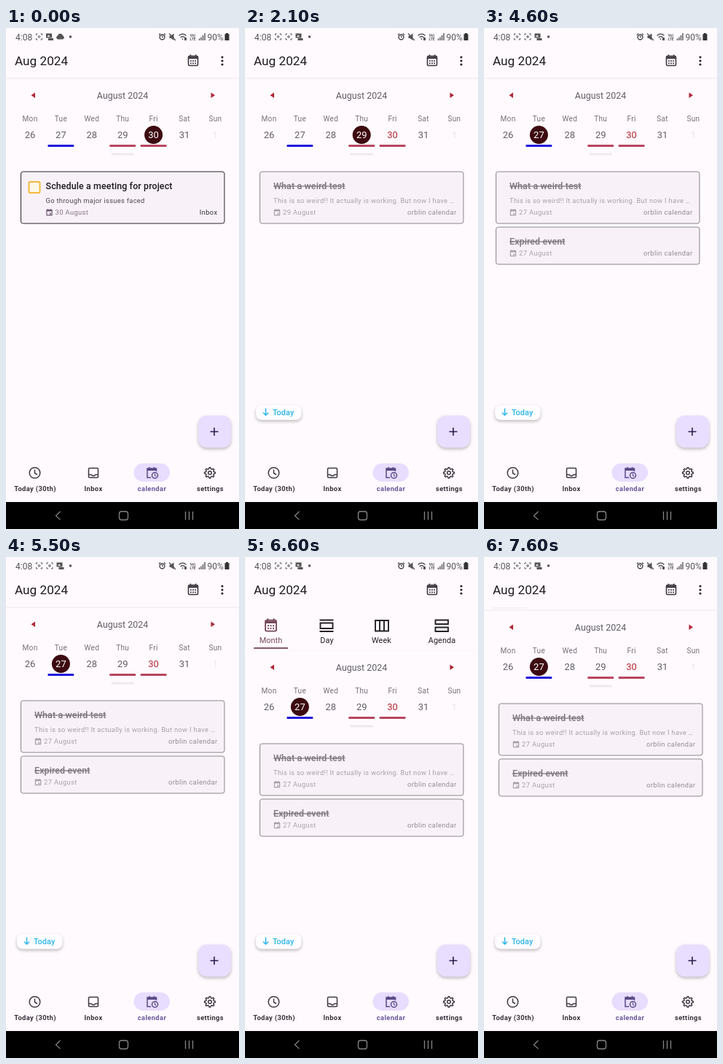
Animation, 320 px wide and 687 px high, one loop 8000 ms. Source, as an HTML page:

```html
<!DOCTYPE html>
<html lang="en">
<head>
<meta charset="utf-8">
<title>Task calendar</title>
<style>
html, body { margin: 0; width: 100%; height: 100%; overflow: hidden; background: #fffafe; }
svg { display: block; width: 100vw; height: 100vh; font-family: Roboto, sans-serif; }
.title { font-size: 12.45px; font-weight: 500; letter-spacing: .117px; }
.small { font-size: 9.34px; letter-spacing: .31px; }
.label { font-size: 9.34px; letter-spacing: .39px; }
.body { font-size: 10.9px; letter-spacing: .08px; }
.nav { font-weight: 600; }
.mid { text-anchor: middle; }
.end { text-anchor: end; }
.line { fill: none; stroke: currentColor; }
.raised { filter: drop-shadow(0 2px 2px #0004); }
</style>
</head>
<body>
<svg viewBox="0 0 320 687" preserveAspectRatio="none">
  <defs>
    <g id="event" class="line" stroke-width="1.2">
      <path d="M-3.6-3.4h7.2v7h-7.2zM-2-5v2M2-5v2"/>
      <path d="M-3.6-2.6h7.2" stroke-width="2"/>
      <path d="M.3.6h2v2h-2z" fill="currentColor" stroke="none"/>
    </g>
    <g id="month" class="line" stroke-width="1.6">
      <rect x="-6.5" y="-6" width="13" height="13" rx="1.5"/>
      <path d="M-6.5-3.7h13" stroke-width="3"/>
      <path d="M-3.6-8v3M3.6-8v3"/>
      <path d="M-4 .6h8M-4 3.8h8" stroke-width="1.7" stroke-dasharray="1.8 1.3"/>
    </g>
    <g id="scan" class="line" stroke-width="1">
      <path d="M-4-2v-2h2M2-4h2v2M4 2v2h-2M-2 4h-2v-2"/>
      <circle r="1.3"/>
    </g>
    <g id="picture">
      <path d="M-5-4.5h8v6h-8zM-2 2h7v3h-7z" fill="currentColor"/>
      <path d="M-3.5 0l2-2.5 2 2.5z" fill="#fffafe"/>
    </g>
    <path id="cloud" d="M-3.5 3.5a2.6 2.6 0 0 1 0-5a3.6 3.6 0 0 1 7 0a2.6 2.6 0 0 1 0 5z" fill="currentColor"/>
    <clipPath id="tabClip"><rect id="tabWindow" y="69" width="320" height="0"/></clipPath>
  </defs>

  <rect width="320" height="687" fill="#fffafe"/>

  <g color="#555" fill="#555">
    <text x="13" y="16.5" font-size="12">4:08</text>
    <use href="#scan" x="45.5" y="12"/>
    <g id="noticesA"><use href="#picture" x="60" y="12"/><use href="#cloud" x="74.5" y="12"/></g>
    <g id="noticesB"><use href="#scan" x="60" y="12"/><use href="#picture" x="74.5" y="12"/></g>
    <circle cx="88.5" cy="12" r="1.8"/>
    <g class="line" stroke-width="1.6">
      <circle cx="214.5" cy="12.5" r="3.4"/>
      <path d="M214.5 10.5v2h1.5M210 9.5l2-2M219 9.5l-2-2" stroke-width="1.2"/>
      <path d="M224 7.5l9 9.5" stroke-width="1.2"/>
      <path d="M237.500 10.500q5-4.500 10 0M239.500 13q3-2.500 6 0" stroke-width="1.3"/>
      <path d="M265.500 17v-2.500M268 17v-4.500M270.500 17v-7M273 17v-10" stroke-width="1.4"/>
    </g>
    <path d="M224.500 10.500h2l4-3v9.500l-4-3h-2zM241 14.500h3l-1.500 2zM245 13h3v4h-3z"/>
    <text class="mid" x="256.500" y="11.5" font-size="5" font-weight="700">Vo)</text>
    <text class="mid" x="256.500" y="16.8" font-size="5" font-weight="700">LTE</text>
    <text x="276.500" y="16.5" font-size="12">90%</text>
    <path d="M302 7h3v1.300h1.500v8.700h-6v-8.700h1.500z" fill="#333"/>
  </g>

  <text x="12" y="51" font-size="17.2" fill="#1f1b20">Aug 2024</text>
  <use href="#month" x="257" y="44.500" color="#3c383f"/>
  <g fill="#29252c"><circle cx="297" cy="40" r="1.6"/><circle cx="297" cy="45" r="1.6"/><circle cx="297" cy="50" r="1.6"/></g>

  <g clip-path="url(#tabClip)">
    <g id="tabs" class="body mid" color="#252127" fill="#252127">
      <g color="#75485a" fill="#75485a">
        <use href="#month" transform="translate(35.500 93.500) scale(1.15)"/>
        <text x="35.500" y="118">Month</text>
        <rect x="12" y="124" width="47" height="1.800"/>
      </g>
      <g class="line" stroke-width="1.900">
        <path d="M102.500 86.500h19M102.500 102h19M103.500 90.500h17v7.500h-17z"/>
        <path d="M179 87h18v14.500h-18zM185 87v14.500M191 87v14.500"/>
        <path d="M261.500 86.500h17.500v5.500h-17.500zM261.500 96.500h17.500v5.500h-17.500z"/>
      </g>
      <text x="112.500" y="118">Day</text>
      <text x="187.500" y="118">Week</text>
      <text x="270.500" y="118">Agenda</text>
    </g>
  </g>

  <g id="content">
    <path id="divider" d="M0 69h320" stroke="#eee7ee"/>
    <path d="M40 88.500v7.500l-5.500-3.700zM281.500 88.500v7.500l5.500-3.700z" fill="#b02736"/>
    <text class="mid" x="160" y="97" font-size="12.45" fill="#625d66">August 2024</text>
    <g id="days" class="mid"></g>
    <rect x="144.500" y="171.500" width="31.500" height="3" rx="1.500" fill="#eee9ef"/>
    <g id="pages"></g>
  </g>

  <g id="today">
    <rect class="raised" x="15" y="517" width="62.500" height="20.500" rx="8" fill="#fffdff"/>
    <g color="#2cb5e8">
      <path class="line" stroke-width="1.500" d="M28.500 521.500v9.500M25 527.500l3.500 3.500 3.500-3.500"/>
      <text class="body" x="38" y="531" fill="currentColor" font-weight="500">Today</text>
    </g>
  </g>

  <rect class="raised" x="264" y="531.500" width="45" height="44" rx="12" fill="#e9deff"/>
  <path d="M280.500 553.500h11M286 548v11" stroke="#2b1c50" stroke-width="1.600"/>

  <rect x="175.500" y="597" width="49.500" height="25" rx="12.500" fill="#e8dcff"/>
  <g class="line" color="#3e3942" stroke-width="1.500">
    <circle cx="39.500" cy="610" r="7.300"/><path d="M39.500 605.500v5l3.500 2"/>
    <rect x="113.500" y="603.500" width="13" height="13" rx="1.500"/><path d="M113.500 612.500h3.500q3 3.500 6 0h3.500"/>
    <circle cx="280" cy="610" r="2.300"/>
    <path id="gear"/>
    <g color="#594a85" stroke="#594a85">
      <path d="M199 616.500h-5v-12.500h12.500v4M197 602v3M203.500 602v3"/>
      <path d="M194 605.500h12.500" stroke-width="3"/>
      <circle cx="204.500" cy="613.500" r="4"/><path d="M204.500 611v2.700l1.800 1" stroke-width="1.100"/>
    </g>
  </g>
  <g class="label nav mid" fill="#343038">
    <text x="40" y="635">Today (30th)</text>
    <text x="120" y="635">Inbox</text>
    <text x="200.500" y="635" fill="#67559b">calendar</text>
    <text x="280.500" y="635">settings</text>
  </g>

  <rect y="650" width="320" height="37" fill="#000"/>
  <g class="line" color="#858585" stroke-width="1.300">
    <path d="M74.500 663l-6 5.700 6 5.700"/>
    <rect x="155.500" y="663" width="12" height="11.500" rx="3"/>
    <path d="M246.500 663v11.500M251.500 663v11.500M256.500 663v11.500"/>
  </g>
</svg>

<script>
const LOOP = 8000, STEP = 100, PAGE = 320;
const $ = id => document.getElementById(id);

// [time, value] tables
const SCROLL = [
  [1000, 0], [1100, 9], [1200, 29], [1300, 29], [1400, 64], [1500, 190], [1600, 280], [1700, 312], [1800, 320],
  [2300, 320], [2400, 340], [2500, 400], [2600, 530], [2700, 606], [2800, 633], [2900, 640],
  [3200, 640], [3300, 710], [3400, 925], [3500, 960],
  [4500, 960], [4600, 956], [4800, 956], [5000, 960]
];
const EXPAND = [
  [5900, 0], [6000, 8], [6100, 29], [6200, 46], [6300, 55], [6400, 58], [6500, 59],
  [7200, 59], [7300, 48], [7400, 26], [7500, 11], [7600, 4]
];
const SELECTED = [[0, 4], [2100, 3], [3200, 2], [4100, 1]];

function tween(table, t) {
  const i = table.findIndex(([time]) => time > t);
  if (i === 0) return table[0][1];
  if (i < 0) return table[table.length - 1][1];
  const [[t0, a], [t1, b]] = [table[i - 1], table[i]];
  return a + (b - a) * (t - t0) / (t1 - t0);
}
const held = (table, t) => table.filter(([time]) => time <= t).pop()[1];

// Week strip
const BARS = { 1: '#2015dd', 3: '#b8455f', 4: '#b8455f' };
const COLORS = ['#625d66', '#625d66', '#625d66', '#625d66', '#b62631', '#625d66', '#efe5ed'];
$('days').innerHTML = ['Mon', 'Tue', 'Wed', 'Thu', 'Fri', 'Sat', 'Sun'].map((name, i) => {
  const x = 33 + i * 42.4;
  const bar = BARS[i] ? `<rect x="${x - 18}" y="160" width="36" height="3" rx="1" fill="${BARS[i]}"/>` : '';
  return `<text x="${x}" y="127.500" font-size="10.100" letter-spacing=".3" fill="#77717a">${name}</text>
    <circle cx="${x}" cy="146.500" r="12.500" fill="#3c0a10"/>
    <text class="number" x="${x}" y="151.200" font-size="13">${i < 6 ? 26 + i : 1}</text>${bar}`;
}).join('');
const circles = document.querySelectorAll('#days circle');
const numbers = document.querySelectorAll('#days .number');

// Task cards
function card({ y, title, note, date, list, done }) {
  const h = note ? 71 : 51, x = done ? 18.5 : 34, row = h - 12;
  const [edge, ink, soft] = done ? ['#8c868c', '#7c757c', '#a8a0a8'] : ['#29252b', '#1e1a20', '#4b464e'];
  const dateInk = done ? '#aaa0a9' : '#857386';
  const box = done ? '' : '<rect x="11" y="14" width="15" height="15" rx="1.500" fill="#fff7e4" stroke="#f2b93f" stroke-width="2"/>';
  const strike = done ? 'text-decoration="line-through"' : '';
  return `<g transform="translate(20.500 ${y})">
    <rect width="279.500" height="${h}" rx="3" fill="#f8f2f8" stroke="${edge}"/>${box}
    <text class="title" x="${x}" y="24" fill="${ink}" ${strike}>${title}</text>
    ${note ? `<text class="small" x="${x}" y="43" fill="${soft}">${note}</text>` : ''}
    <use href="#event" x="${x + 5}" y="${row - 3}" color="${done ? dateInk : '#6d5a70'}"/>
    <text class="label" x="${x + 13}" y="${row}" fill="${dateInk}">${date}</text>
    <text class="label end" x="270" y="${row}" fill="${done ? '#928b92' : '#343038'}">${list}</text></g>`;
}
const weird = date => card({
  y: 197, title: 'What a weird test', date, list: 'orblin calendar', done: true,
  note: 'This is so weird!! It actually is working. But now I have …'
});
const pages = [
  card({ y: 197, title: 'Schedule a meeting for project', note: 'Go through major issues faced', date: '30 August', list: 'Inbox' }),
  weird('29 August'),
  '<text class="body mid" x="160" y="206.500" fill="#2b272d">No tasks for this date</text>',
  weird('27 August') + card({ y: 273, title: 'Expired event', date: '27 August', list: 'orblin calendar', done: true })
];
$('pages').innerHTML = pages.map((p, i) => `<g transform="translate(${-PAGE * i} 0)">${p}</g>`).join('');

// Settings gear: eight teeth
$('gear').setAttribute('d', 'M' + Array.from({ length: 32 }, (_, i) => {
  const a = (i - .5) * Math.PI / 16, r = i % 4 < 2 ? 7.4 : 5.5;
  return `${(280 + r * Math.sin(a)).toFixed(2)} ${(610 - r * Math.cos(a)).toFixed(2)}`;
}).join('L') + 'Z');

function draw(t) {
  const open = tween(EXPAND, t), day = held(SELECTED, t);
  $('pages').setAttribute('transform', `translate(${tween(SCROLL, t)} 0)`);
  $('content').setAttribute('transform', `translate(0 ${open})`);
  $('divider').setAttribute('opacity', 1 - .7 * open / 59);
  $('tabWindow').setAttribute('height', open);
  $('tabs').setAttribute('transform', `translate(0 ${open - 59})`);
  $('tabs').setAttribute('opacity', open / 59);
  $('today').setAttribute('opacity', t >= 1700 ? 1 : 0);
  $('noticesA').setAttribute('opacity', t < 400 ? 1 : 0);
  $('noticesB').setAttribute('opacity', t < 400 ? 0 : 1);
  circles.forEach((c, i) => c.setAttribute('opacity', i === day ? 1 : 0));
  numbers.forEach((n, i) => n.setAttribute('fill', i === day ? '#fff' : COLORS[i]));
}

const start = performance.now();
function frame() {
  const t = (performance.now() - start) % LOOP;
  draw(Math.floor(t / STEP) * STEP);
  requestAnimationFrame(frame);
}
frame();
</script>
</body>
</html>
```
